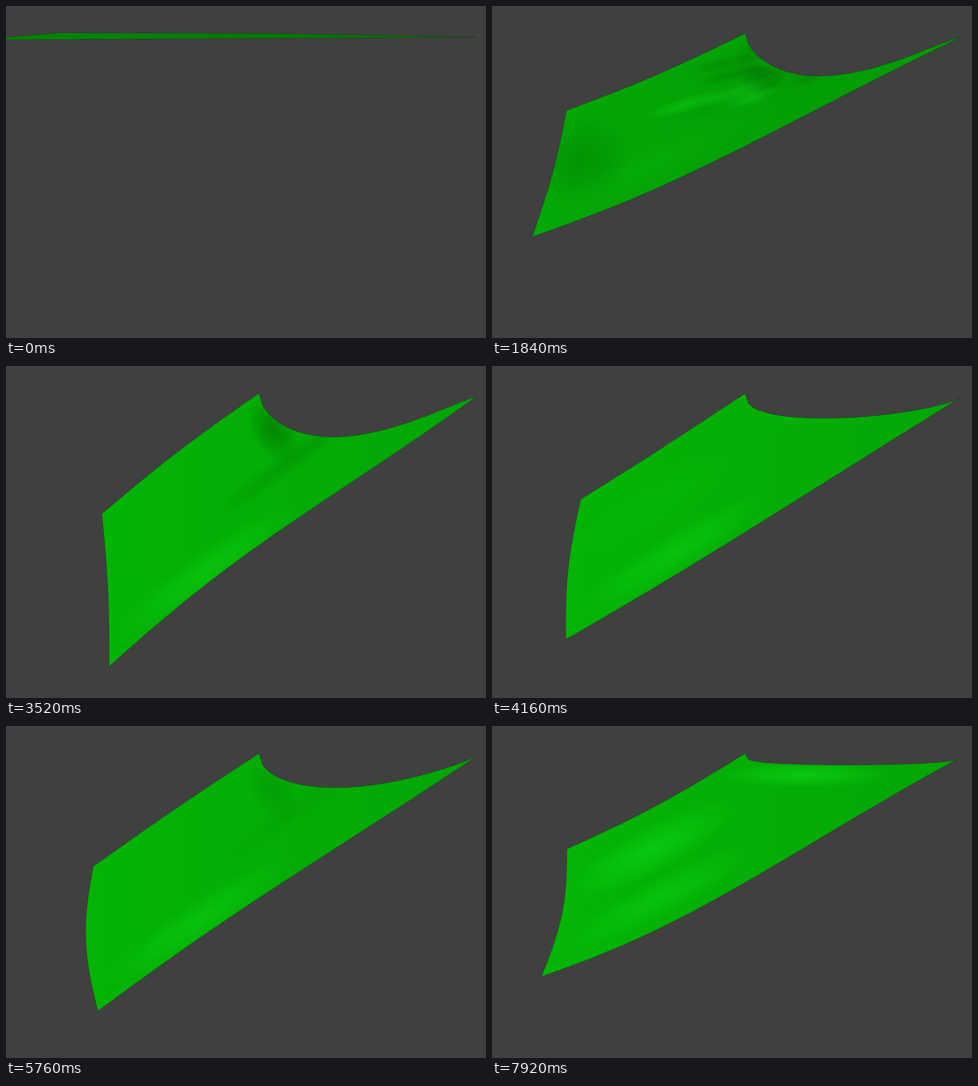
Recreate the animation shown at these times as an HTML page with a canvas. Size 480x332 px, loop 8000 ms.

```html
<!DOCTYPE html>
<html lang="en">
<head>
<meta charset="utf-8">
<title>Falling cloth</title>
<style>
  html, body { margin: 0; width: 100%; height: 100%; overflow: hidden; background: #404040; }
  canvas { display: block; }
</style>
</head>
<body>
<canvas id="stage" width="480" height="332"></canvas>
<script>
const ctx = document.getElementById('stage').getContext('2d');
const LOOP = 8000, STEP = 80;
const FALL_START = 240, FALL_TIME = 2450;
const SWING_START = 3300, SWING_PERIOD = 3050;

const pinLeft = [253, 27.5], pinRight = [469.5, 31];
const flatBottom = [-30, 34], flatUpper = [52, 27];

const clamp = (value, low = 0, high = 1) => Math.min(high, Math.max(low, value));
const lerp = (a, b, s) => a + (b - a) * s;
const mix = (p, q, s) => p.map((value, i) => lerp(value, q[i], s));

// Share of the fall that is done, eased like a pendulum quarter turn.
const fallen = time =>
  Math.sin(Math.PI / 2 * clamp((time - FALL_START) / FALL_TIME)) ** 2;

// Periods since the cloth first reached its forward end.
const swings = time => Math.max(0, time - SWING_START) / SWING_PERIOD;
const swing = time => Math.cos(2 * Math.PI * swings(time));

function poseAt(time) {
  const fall = fallen(time), sway = swing(time), drift = swings(time);
  const bottom = [88 - 12 * drift + 22 * swing(time + 150), 279 - 3 * drift + 24 * sway];
  const upper = [92 - 8 * drift + 5 * sway, 136 + 13 * sway];
  const inflate = 56 * Math.exp(-(((time - 2350) / 600) ** 2));
  return {
    fall, sway,
    bottom: [lerp(flatBottom[0], bottom[0], fall ** 2.2), lerp(flatBottom[1], bottom[1], fall)],
    upper: [lerp(flatUpper[0], upper[0], fall ** 2.2), lerp(flatUpper[1], upper[1], fall ** 1.45)],
    sag: (27 + 17 * sway) * fall ** 0.2,
    bow: (inflate - 14 * sway) * fall,
    flutter: (10 * Math.cos(2 * Math.PI * (time - 2600) / 5200) - 2) * fall
  };
}

// Adds an edge whose chord is displaced along one axis (0 = x, 1 = y).
function addEdge(path, from, to, axis, offset) {
  const pieces = 60;
  for (let i = 1; i <= pieces; i++) {
    const s = i / pieces, point = mix(from, to, s);
    point[axis] += offset(s);
    path.lineTo(...point);
  }
}

function outline({ bottom, upper, sway, sag, bow, flutter }) {
  const sharpness = 0.675 + 0.325 * sway;
  const hang = s => ((3 * s) ** 0.6 * (1.5 * (1 - s)) ** 1.2) ** sharpness;
  const path = new Path2D();
  path.moveTo(...pinLeft);
  addEdge(path, pinLeft, pinRight, 1, s => sag * hang(s));
  addEdge(path, pinRight, bottom, 1, s => bow * Math.sin(Math.PI * s ** 1.6));
  addEdge(path, bottom, upper, 0, s => flutter * Math.sin(Math.PI * s));
  addEdge(path, upper, pinLeft, 1, s => bow / 3 * Math.sin(Math.PI * s));
  path.closePath();
  return path;
}

// Soft ellipse; negative strength darkens.
function glow([x, y], rx, ry, angle, strength) {
  const tone = strength > 0 ? '20,235,30' : '0,65,0';
  const alpha = Math.abs(strength);
  const fill = ctx.createRadialGradient(0, 0, 0, 0, 0, 1);
  fill.addColorStop(0, `rgba(${tone},${alpha})`);
  fill.addColorStop(0.5, `rgba(${tone},${alpha * 0.55})`);
  fill.addColorStop(1, `rgba(${tone},0)`);
  ctx.save();
  ctx.translate(x, y);
  ctx.rotate(angle);
  ctx.scale(rx, ry);
  ctx.fillStyle = fill;
  ctx.fillRect(-1, -1, 2, 2);
  ctx.restore();
}

function seededRandom(seed) {
  return () => (seed = seed * 16807 % 2147483647) / 2147483647;
}

function shadeCloth({ bottom, upper, fall, sway }) {
  // along: 0 at the pins, 1 at the free edge; across: 0 above, 1 at the hem
  const at = (along, across) =>
    mix(mix(pinLeft, pinRight, across), mix(upper, bottom, across), along);
  const slope = Math.atan2(bottom[1] - pinRight[1], bottom[0] - pinRight[0]) + Math.PI;
  const forward = clamp(sway) * fall, back = clamp(-sway);

  glow([267, 64], 22, 36, -0.5, -0.4 * forward);
  glow(at(0.3, 0.55), 110, 12, slope, -0.18 * forward);
  glow([312, 49], 85, 13, 0, 0.45 * back);
  glow(at(0.65, 0.4), 95, 24, slope, 0.4 * back);
  glow(at(0.7, 0.85), 110, 20, slope, 0.3 * fall ** 4);

  // Small creases while the cloth tumbles.
  const random = seededRandom(11);
  const tumble = 4 * fall * (1 - fall);
  for (let i = 0; i < 8; i++) {
    const place = at(0.1 + 0.5 * random(), 0.15 + 0.7 * random());
    glow(place, 30 + 30 * random(), 8, slope + 0.3 * random(), (i % 2 ? 0.4 : -0.25) * tumble);
  }
  glow(at(0.9, 0.5), 55, 45, slope, -0.25 * tumble);
}

function draw(now) {
  const time = Math.floor(now % LOOP / STEP) * STEP;
  const pose = poseAt(time);
  const cloth = outline(pose);
  const green = Math.round(lerp(132, 182, pose.fall));
  const base = ctx.createLinearGradient(40, 0, 470, 0);
  base.addColorStop(0, `rgb(3,${green},5)`);
  base.addColorStop(1, `rgb(3,${green - 16},5)`);

  ctx.fillStyle = '#404040';
  ctx.fillRect(0, 0, 480, 332);
  ctx.save();
  ctx.clip(cloth);
  ctx.fillStyle = base;
  ctx.fillRect(0, 0, 480, 332);
  shadeCloth(pose);
  ctx.restore();
  ctx.lineWidth = 0.6;
  ctx.strokeStyle = 'rgba(0,50,0,0.35)';
  ctx.stroke(cloth);
}

let origin;
function tick(now) {
  origin ??= now;
  draw(now - origin);
  requestAnimationFrame(tick);
}
draw(0);
requestAnimationFrame(tick);
</script>
</body>
</html>
```
